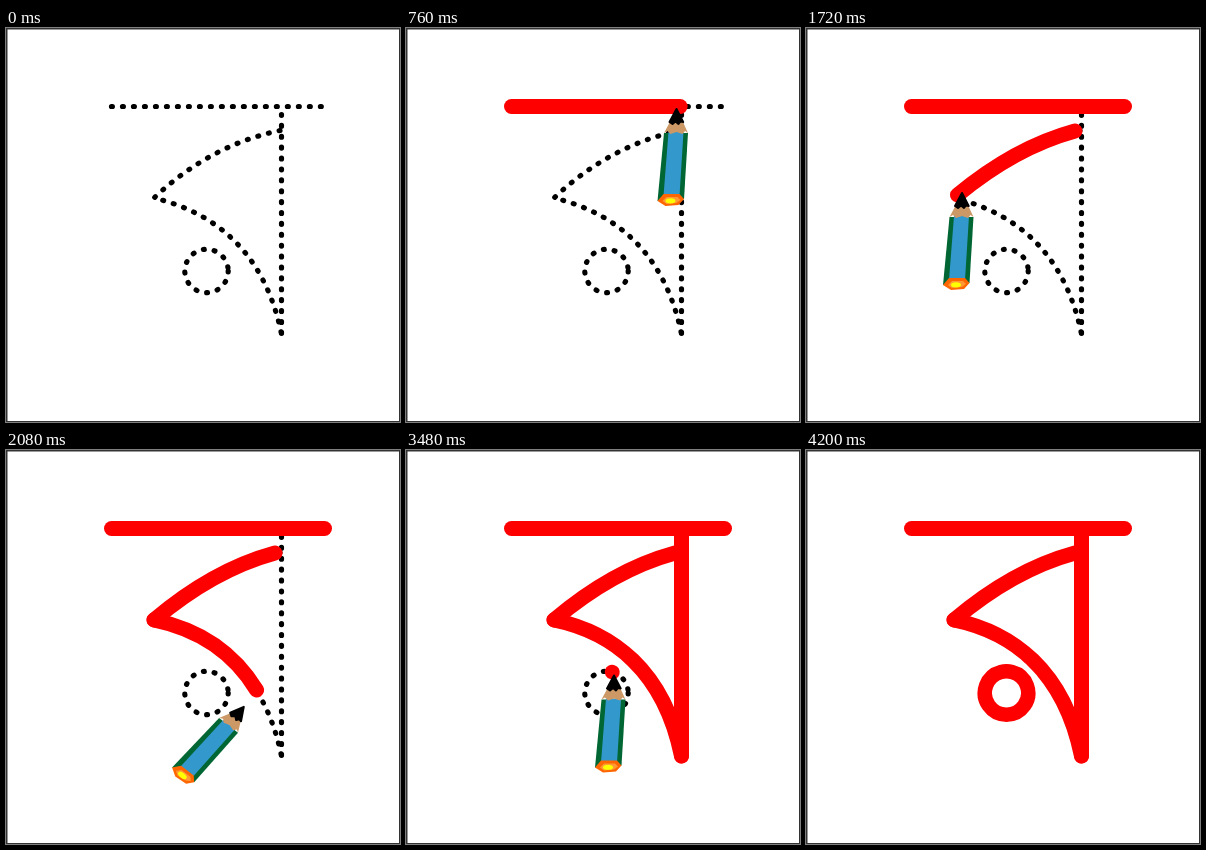
Animation of 394 by 394 pixels, one loop 4.24 s. Source, as an HTML page:

```html
<!DOCTYPE html>
<html lang="en">
<head>
<meta charset="utf-8">
<title>Letter tracing</title>
<style>
  html, body { margin: 0; width: 100%; height: 100%; overflow: hidden; background: #fff; }
  svg { display: block; width: 100%; height: 100%; }
  .line { fill: none; stroke-linecap: round; stroke-linejoin: round; }
  #dots { stroke: #000; stroke-width: 5.2; }
  #ink { stroke: #f00; stroke-width: 15; }
</style>
</head>
<body>
<svg viewBox="0 0 394 394">
  <rect width="394" height="394" fill="#333"/>
  <rect x="1.5" y="1.5" width="391.5" height="391.5" fill="#fff"/>
  <g id="dots" class="line"></g>
  <g id="ink" class="line"></g>
  <g id="pencil">
    <path fill="#063" d="M-12.5 25L11.5 25L7.5 91L-19 93Z"/>
    <path fill="#39c" d="M-8 24L7 24L3 88L-13 88Z"/>
    <path fill="#c96" d="M-5 11L5 11L11.5 25L8.5 23L6 26L0 24L-6 26L-9 23L-12.5 25Z"/>
    <path stroke="#000" stroke-width="2" stroke-linejoin="round" d="M0 1L6.7 14L4 13.5L2 16L-1 13.5L-4 16L-7 14Z"/>
    <path fill="#f60" d="M-19 93L-13 86L3 86L7.5 91L2 97L-11 98Z"/>
    <path fill="#f93" d="M-14 93L-10 89L1 89L4 92L0 95L-10 96Z"/>
    <ellipse cx="-6" cy="92.8" rx="5" ry="2.6" fill="#ff0"/>
  </g>
</svg>
<script>
const STEP = 40, STEPS = 106;
const RAD = Math.PI / 180;

// Dotted guides: path and its length in dot spacings
const guides = [
  ['M105.5 78.5H315.5', 19.1],
  ['M275.5 86.5V305.5', 20.1],
  ['M274 102.5Q204 117 148 170C206 184 258 221 275.5 306', 31.2],
  ['M222.2 243a21.7 21.7 0 1 1 -43.4 0a21.7 21.7 0 1 1 43.4 0', 12.39],
];

// Ink strokes: path, first step, last step
const strokes = [
  ['M105.5 78.5H318.5', 0, 24],
  ['M269 103Q207 120 148 170', 34, 43.3],
  ['M148 170C206 182 258 220 275.5 306', 43.5, 56.7],
  ['M275.5 306V78.5', 56, 69.6],
  ['M206 222a21.7 21.7 0 1 1 -11 0a21.7 21.7 0 0 1 11 0', 86.95, 100],
];

// Pencil keys: step, tip x, tip y, turn in degrees
const keys = [
  [1, 99.5, 80, 0],
  [24, 318, 80, 0],
  [34, 275, 100.5, 0],
  [43, 156, 164, 0],
  [56, 275, 297, 55],
  [71, 276, 81.5, 0],
];

const clamp = v => Math.max(0, Math.min(1, v));
const progress = (s, from, to) => clamp((s - from) / (to - from));
const pencil = document.getElementById('pencil');

function addPath(parent, d, length) {
  const path = document.createElementNS('http://www.w3.org/2000/svg', 'path');
  path.setAttribute('d', d);
  path.setAttribute('pathLength', length);
  return document.getElementById(parent).appendChild(path);
}

for (const [d, length] of guides) {
  addPath('dots', d, length).setAttribute('stroke-dasharray', '.08 .92');
}
const ink = strokes.map(([d, from, to]) => ({ path: addPath('ink', d, 1), from, to }));
ink[4].path.setAttribute('stroke-width', 14.5);

function pencilPose(s) {
  if (s >= 87) {
    const p = progress(s, 87, 100);
    const a = (-75.5 + 331 * p) * RAD;
    return [203 + 20 * Math.cos(a), 243.8 + 20 * Math.sin(a), 34 * (1 - Math.abs(2 * p - 1))];
  }
  const next = keys.findIndex(k => k[0] >= s);
  const i = next < 0 ? keys.length - 1 : Math.max(1, next);
  const a = keys[i - 1], b = keys[i];
  const p = progress(s, a[0], b[0]);
  return [1, 2, 3].map(n => a[n] + (b[n] - a[n]) * p);
}

function draw(s) {
  for (const { path, from, to } of ink) {
    const p = progress(s, from, to);
    path.style.display = p > 0 ? '' : 'none';
    path.setAttribute('stroke-dasharray', p < 1 ? `${p} 2` : 'none');
  }
  const [x, y, turn] = pencilPose(s);
  pencil.setAttribute('transform', `translate(${x} ${y}) rotate(${turn})`);
  pencil.setAttribute('opacity', s < 1 ? 0 : 1 - progress(s, 100, 105));
}

const start = performance.now();
function tick() {
  const elapsed = Math.max(0, performance.now() - start);
  draw(Math.floor(elapsed / STEP) % STEPS);
  requestAnimationFrame(tick);
}
tick();
</script>
</body>
</html>
```
